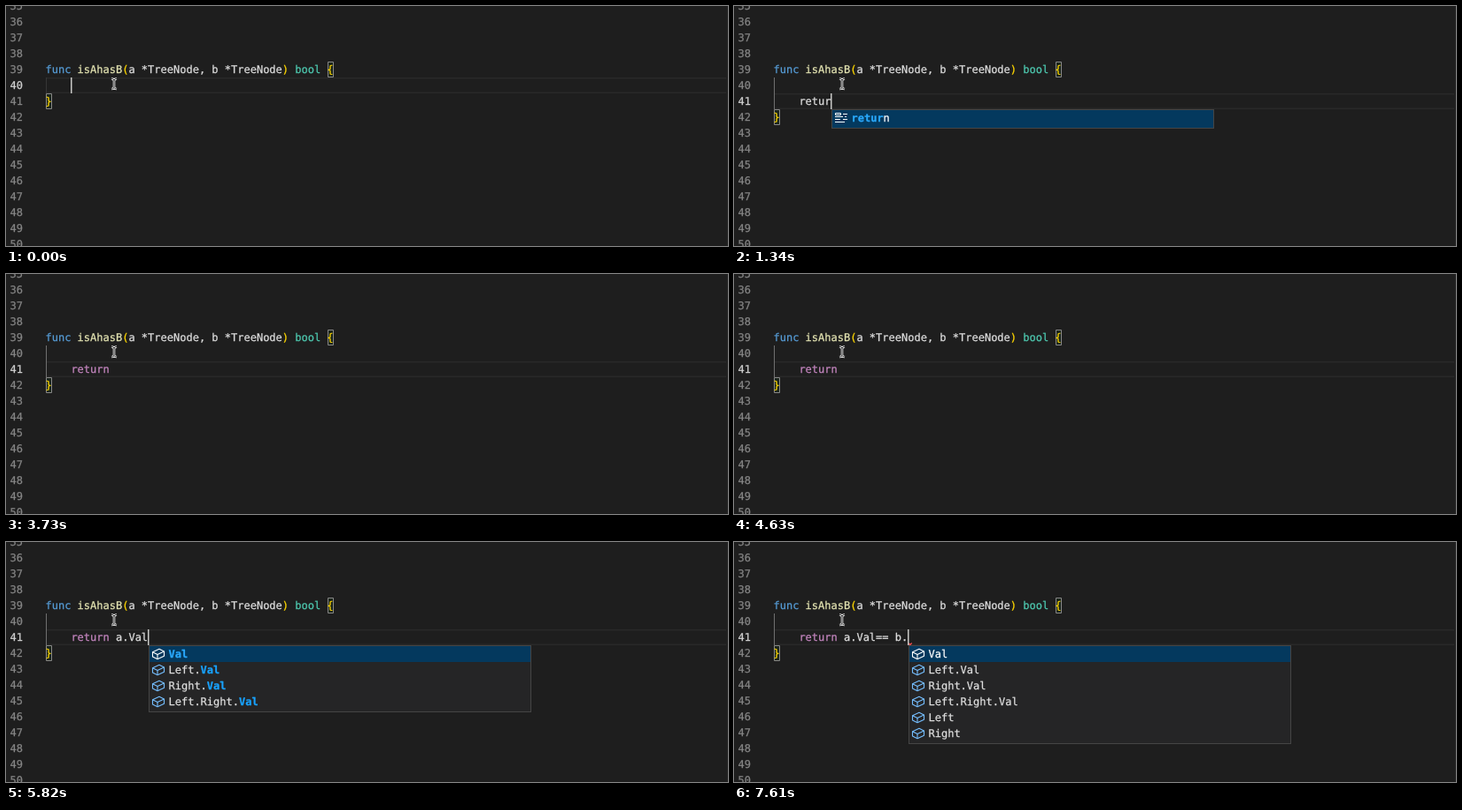
An HTML page with a canvas for the animation above (8000 ms loop, 815 px wide and 272 px high).

```html
<!DOCTYPE html>
<html lang="en">
<head>
<meta charset="utf-8">
<title>Code editor</title>
<style>
  html, body { margin: 0; width: 815px; height: 272px; overflow: hidden; background: #1e1e1e; }
  canvas { display: block; }
</style>
</head>
<body>
<canvas id="stage" width="815" height="272"></canvas>
<script>
const ctx = document.getElementById('stage').getContext('2d');
const LOOP = 8000, LINE = 18, CHAR = 7.224, LEFT = 44.5;
const FONT = '12px "DejaVu Sans Mono", monospace';
const FG = '#dedede', GOLD = '#ffd700';

const keywords = s => s.split(' ').map(label => ({ label, icon: 'keyword' }));
const fields = s => s.split(' ').map(label => ({ label, icon: 'field' }));

const rWords = keywords('return range rune recover real result root right row read');
const reWords = keywords('return recover real result read range rune root right row');
const aWords = fields('a append any array area active apply assert atom axis');
const bWords = fields('b bool byte break base batch begin block body buffer');
const members = fields('Left Right Val Left.Right Left.Val Right.Val');
const values = fields('Val Left.Val Right.Val Left.Right.Val');
const rankedMembers = fields('Val Left.Val Right.Val Left.Right.Val Left Right');

// Each step: start time, typed text, caret visible, suggestions, matched prefix
const steps = [
  [0, '', true],
  [150, '', false],
  [600, '', true],
  [900, 'r', true, rWords, 'r'],
  [1050, 're', true, reWords, 're'],
  [1200, 'ret', true, keywords('return'), 'ret'],
  [1340, 'retur', true, keywords('return'), 'retur'],
  [1490, 'return', true],
  [1940, 'return', false],
  [2240, 'return ', true],
  [2690, 'return ', false],
  [3130, 'return ', true],
  [3730, 'return ', false],
  [4180, 'return ', true],
  [4630, 'return ', false],
  [4930, 'return a', true, aWords, 'a'],
  [5380, 'return a.', true, members, ''],
  [5530, 'return a.V', true, values, 'V'],
  [5680, 'return a.Va', true, values, 'Va'],
  [5820, 'return a.Val', true, values, 'Val'],
  [5960, 'return a.Val', true],
  [6260, 'return a.Val', false],
  [6560, 'return a.Val=', true],
  [6710, 'return a.Val==', true],
  [7160, 'return a.Val==', false],
  [7310, 'return a.Val== ', true],
  [7460, 'return a.Val== b', true, bWords, 'b'],
  [7610, 'return a.Val== b.', true, rankedMembers, '']
];

const colX = col => LEFT + col * CHAR;
const lineTop = n => (n - 35) * LINE - 9;

function rect(color, x, y, w, h) {
  ctx.fillStyle = color;
  ctx.fillRect(x, y, w, h);
}

// A hairline stroke gives the slightly heavy rendering of a smoothed font
function text(str, x, y, color, bold) {
  ctx.font = (bold ? 'bold ' : '') + FONT;
  ctx.fillStyle = ctx.strokeStyle = color;
  ctx.lineWidth = 0.25;
  ctx.fillText(str, x, y);
  ctx.strokeText(str, x, y);
}

function code(line, col, runs) {
  for (const [str, color] of runs) {
    text(str, colX(col), lineTop(line) + 13, color);
    col += str.length;
  }
}

function polyline(points, color, width) {
  ctx.beginPath();
  points.forEach(([x, y], i) => i ? ctx.lineTo(x, y) : ctx.moveTo(x, y));
  ctx.strokeStyle = color;
  ctx.lineWidth = width;
  ctx.stroke();
}

function bracket(line, col, char) {
  const x = Math.ceil(colX(col)) + 0.5, y = lineTop(line) + 0.5;
  ctx.fillStyle = 'rgba(0,100,0,.1)';
  ctx.strokeStyle = '#888';
  ctx.lineWidth = 1;
  ctx.fillRect(x, y, 6, 17);
  ctx.strokeRect(x, y, 6, 17);
  code(line, col, [[char, GOLD]]);
}

function squiggle(x, y, width) {
  const points = [];
  for (let i = 0; i <= width; i++) points.push([x + i, y + [0, 1, 2, 1][i % 4]]);
  polyline(points, '#f14c4c', 1.3);
}

function fieldIcon(x, y, color) {
  const at = points => points.map(([px, py]) => [x + px, y + py]);
  polyline(at([[9, 2.5], [14.5, 5.3], [14.5, 10.5], [7, 14], [1.5, 11.2],
    [1.5, 6], [9, 2.5], [14.5, 5.3]]), color, 1.1);
  polyline(at([[1.5, 6], [7, 8.8], [14.5, 5.3]]), color, 1.1);
  polyline(at([[7, 8.8], [7, 14]]), color, 1.1);
}

function keywordIcon(x, y, color) {
  ctx.strokeStyle = color;
  ctx.lineWidth = 1;
  ctx.strokeRect(x + 1.5, y + 2.5, 6, 2);
  for (const [px, py, w] of [[10, 3, 5], [1, 6, 9], [12, 6, 2], [1, 9, 6], [10, 9, 5], [1, 12, 11]])
    rect(color, x + px, y + py, w, 1);
}

function suggestions(items, match, col) {
  const x = Math.ceil(colX(col)), y = lineTop(42);
  const height = items.length * LINE + 4;
  rect('#454545', x, y, 432, height);
  rect('#252526', x + 1, y + 1, 430, height - 2);
  rect('#04395e', x + 1, y + 1, 430, items.length > 1 ? LINE : height - 2);
  items.forEach(({ label, icon }, i) => {
    const top = y + 1 + i * LINE, selected = i === 0;
    if (icon === 'field') fieldIcon(x + 3, top + 0.8, selected ? '#fff' : '#75beff');
    else keywordIcon(x + 3, top + 1, selected ? '#fff' : FG);
    const base = selected ? '#fff' : FG;
    const start = match ? label.lastIndexOf(match) : -1;
    const put = (from, to, color, bold) =>
      text(label.slice(from, to), x + 22.5 + from * CHAR, top + 13, color, bold);
    if (start < 0) return put(0, label.length, base);
    const end = start + match.length;
    put(0, start, base);
    put(start, end, selected ? '#2aaaff' : '#18a3ff', true);
    put(end, label.length, base);
  });
}

function pointer() {
  const parts = [
    [[119, 82.5], [120.7, 82.7], [122, 84], [123.3, 82.7], [125, 82.5]],
    [[122, 84], [122, 92.5]],
    [[119, 94], [120.7, 93.8], [122, 92.5], [123.3, 93.8], [125, 94]]
  ];
  for (const p of parts) polyline(p, '#f0f0f0', 2.6);
  for (const p of parts) polyline(p, '#111', 0.9);
}

function draw(t) {
  const [, typed, caret, items, match] = steps.findLast(s => s[0] <= t);
  const current = t < 600 ? 40 : 41;
  const caretCol = 4 + typed.length;
  const top = lineTop(current);

  rect('#1e1e1e', 0, 0, 815, 272);
  rect('#2a2a2a', 814, 0, 1, 272);
  rect('#292929', 45, top, 768, 1.5);
  rect('#292929', 45, top + 16.5, 768, 1.5);
  rect(t < 900 ? '#363636' : '#707070', 45, lineTop(40), 1, (current - 39) * LINE);

  for (let n = 35; n <= 50; n++)
    text(String(n), 4.5, lineTop(n) + 13, n === current ? '#d0d0d0' : '#858585');

  code(39, 0, [['func ', '#569cd6'], ['isAhasB', '#e4e4b2'], ['(', GOLD],
    ['a *TreeNode, b *TreeNode', FG], [')', GOLD], [' bool', '#4ec9b0']]);
  bracket(39, 44, '{');
  bracket(current + 1, 0, '}');

  const done = typed.startsWith('return') ? 6 : 0;
  code(41, 4, [[typed.slice(0, done), '#c586c0'], [typed.slice(done), FG]]);

  if (typed.endsWith('.')) squiggle(colX(caretCol) + 0.5, lineTop(41) + 15.5, 4);
  if (t >= 6710 && t < 7460) squiggle(45, lineTop(42) + 15.5, 6);
  if (caret) rect('#c8c8c6', Math.floor(colX(caretCol)), top, 1.5, LINE);
  if (items) suggestions(items, match, caretCol);
  pointer();
}

ctx.textRendering = 'geometricPrecision';
ctx.lineJoin = 'round';
const origin = performance.now();
function tick() {
  draw((performance.now() - origin) % LOOP);
  requestAnimationFrame(tick);
}
tick();
</script>
</body>
</html>
```
